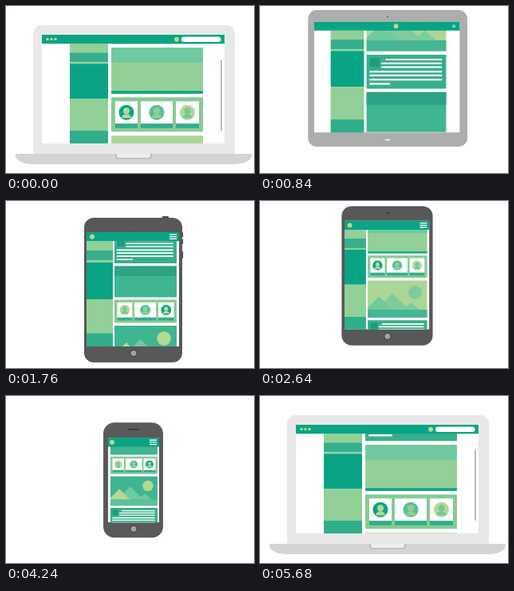
Recreate the animation shown at these times as an HTML page with a canvas. Size 311x209 px, loop 5.72 s.

```html
<!DOCTYPE html>
<html lang="en">
<head>
<meta charset="utf-8">
<title>Responsive layout</title>
<style>
html, body { margin: 0; width: 100%; height: 100%; overflow: hidden; background: #fff; }
canvas { display: block; width: 311px; height: 209px; }
</style>
</head>
<body>
<canvas id="stage" width="311" height="209"></canvas>
<script>
const ctx = document.getElementById('stage').getContext('2d');
const LOOP = 5720, PAGE = 241;
const DARK = '#0aa484', TEAL = '#3fb592', MID = '#70c99f', LIGHT = '#92d097', LIME = '#b4d993', WHITE = '#fff';

const KEYS = ['bx0', 'bx1', 'by0', 'by1', 'r', 'sx0', 'sx1', 'sy0', 'sy1',
  'side0', 'side1', 'main0', 'main1', 'avatar', 'grey', 'laptop', 'phone'];
const pose = (...values) => Object.fromEntries(KEYS.map((k, i) => [k, values[i]]));
const laptop = pose(34, 287, 24, 185, 10, 45, 274, 36, 172, 80, 128, 132, 247, 214, 232, 1, 0);
const tablet = pose(98, 221, 21, 202, 12, 101, 217, 39, 182, 101, 134, 136, 214, 108, 88, 0, 0);
const phone = pose(122, 197, 38, 182, 14, 128, 192, 57, 163, 128, 128, 131, 190, 133, 90, 0, 1);
// The sidebar leaves by shrinking but returns by sliding in from the left.
const phoneOut = { ...phone, side0: -156, side1: 0 };
const hops = [
  { at: 402, from: laptop, to: tablet },
  { at: 2289, from: tablet, to: phone },
  { at: 4175, from: phoneOut, to: laptop }
];

const clamp = v => Math.min(1, Math.max(0, v));
const mix = (a, b, p) => a + (b - a) * p;
const ramp = (t, a, b) => clamp((t - a) / (b - a));
const ease = (t, a, b) => (1 - Math.cos(Math.PI * ramp(t, a, b))) / 2;

function poseAt(t) {
  const hop = hops.filter(h => t >= h.at).pop() || { ...hops[2], at: hops[2].at - LOOP };
  const dt = t - hop.at, p = ease(dt, 200, 740), d = {};
  for (const k of KEYS) d[k] = mix(hop.from[k], hop.to[k], p);
  d.lift = -17.7 * ease(dt, 0, 190) + 21.7 * ease(dt, 740, 890) - 4 * ease(dt, 890, 1030);
  return d;
}

function scrollAt(t) {
  if (t < 700) t += LOOP;
  return 152 + 341.5 * ease(t, 1570, 2400) + 267 * ease(t, 3365, 4205) + 355.5 * ramp(t, 4840, 6420);
}

function box(x0, y0, x1, y1, fill, r = 0) {
  if (x1 <= x0 || y1 <= y0) return;
  ctx.fillStyle = fill;
  ctx.beginPath();
  ctx.roundRect(x0, y0, x1 - x0, y1 - y0, r);
  ctx.fill();
}

function oval(x, y, rx, fill, ry = rx, start = 0) {
  ctx.fillStyle = fill;
  ctx.beginPath();
  ctx.ellipse(x, y, rx, ry, 0, start, Math.PI * 2);
  ctx.fill();
}

function peak(x, y, half, fill) {
  ctx.fillStyle = fill;
  ctx.beginPath();
  ctx.moveTo(x - half, 57);
  ctx.lineTo(x, y);
  ctx.lineTo(x + half, 57);
  ctx.fill();
}

function hero(bright) {
  box(0, 0, 115, 57.5, bright ? LIGHT : TEAL);
  box(0, 0, 115, 18.5, bright ? MID : '#2da385');
  if (bright) box(0, 54, 115, 57.5, DARK);
}

function cards(bright) {
  box(0, 0, 115, 43, '#86cb95');
  const looks = [[DARK, LIME], ['#5abf98', LIGHT], [LIME, MID]];
  if (!bright) looks.reverse();
  [[5, 33], [37, 77], [81, 110]].forEach(([a, b], i) => {
    const x = (a + b) / 2, [back, person] = looks[i];
    box(a, 5, b, 33, WHITE);
    box(a, 33, b, 38.5, '#30ae8b');
    oval(x, 19, 9.5, back);
    oval(x, 17, 4, person);
    oval(x, 26, 6, person, 5, Math.PI);
  });
}

function mountains(bright) {
  box(0, 0, 115, 72, bright ? '#abd698' : TEAL);
  oval(91.5, 23.5, 13, bright ? '#7fcb9d' : LIME);
  ctx.save();
  ctx.beginPath();
  ctx.rect(0, 0, 115, 72);
  ctx.clip();
  peak(48, 25, 33, bright ? '#7fcb9d' : MID);
  peak(84, 42, 17, bright ? '#7fcb9d' : MID);
  peak(22, 31, 26, bright ? MID : LIME);
  ctx.restore();
  box(0, 56.5, 115, 72, bright ? '#45b693' : '#5dc09a');
}

function article() {
  box(0, 0, 115, 49, '#38af8c');
  box(5, 5, 19, 18, '#1f9c7f');
  [7, 12.5, 18, 24.5, 30, 36, 42].forEach((y, i) => {
    const x = i === 0 ? 27 : i < 3 ? 21 : 4;
    box(x, y - 1.25, i === 6 ? 34 : 109, y + 1.25, WHITE, 1.2);
  });
}

const blocks = [[0, hero], [62, cards], [110, mountains], [187, article]];

function drawPage(d, scroll) {
  const scale = (d.main1 - d.main0) / 115, view = (d.sy1 - d.sy0 - 11) / scale;
  ctx.save();
  ctx.translate(d.main0, d.sy0 + 11);
  ctx.scale(scale, scale);
  for (let k = Math.floor(scroll / PAGE); k * PAGE < scroll + view; k++) {
    for (const [top, draw] of blocks) {
      ctx.save();
      ctx.translate(0, k * PAGE + top - scroll);
      draw(k % 2 === 0);
      ctx.restore();
    }
  }
  ctx.restore();
}

function drawSidebar(d) {
  const rows = [0, 11, 23, 25, 69, 109, 126];
  const fills = [LIGHT, '#38af8c', LIGHT, DARK, LIGHT, '#30ae8b'];
  const top = d.sy0 + 11.3, scale = (d.sy1 - top) / 125;
  fills.forEach((fill, i) => box(d.side0, top + rows[i] * scale, d.side1, top + rows[i + 1] * scale, fill));
}

function drawNav(d, open) {
  const y = d.sy0 + 5.5, { laptop: l } = d;
  box(d.sx0, d.sy0, d.sx1, d.sy0 + 11.3, DARK);
  for (let i = 0; i < 3; i++) oval(d.sx0 + 7 + i * 5, y, 1.7 * open, LIME);
  oval(d.avatar, y + .3, 3, LIME);
  const right = d.sx1 - 4.5, reach = 49.5 * clamp((l - .7) * 4), half = mix(.5, 3.2, open);
  box(right - reach, y - half + .3, right, y + half + .3, WHITE, half);
  const k = 1 - l, x = d.sx1 - 7.5;
  if (k > .15) for (const row of [-2.5, .2, 2.9]) {
    box(x - 4.5 * k, y + (row - .65) * k, x + 4.5 * k, y + (row + .65) * k, WHITE);
  }
}

function drawButtons(t) {
  const fill = '#48494b';
  const a = 3 * (ease(t, 1290, 1390) - ease(t, 2200, 2289));
  if (a > 0) {
    box(196, 22 - a, 204, 24, fill, 1);
    for (const [y0, y1] of [[39, 45], [48, 54], [63, 72]]) box(216, y0, 220 + a * .7, y1, fill, 1);
  }
  const b = 2 * (ease(t, 3180, 3280) - ease(t, 4085, 4175));
  if (b > 0) {
    for (const y of [57, 69, 79]) box(122.5 - b, y, 126, y + 6, fill, 1);
    box(194, 69, 196.5 + b, 88, fill, 1);
  }
}

function drawBody(d, open) {
  const chin = clamp((d.laptop - .55) * 4), grey = v => `rgb(${v},${v},${v})`;
  const height = mix(11, 13, open) * chin, bottom = d.by1 + height;
  box(d.bx0, d.by0, d.bx1, mix(bottom, d.by1, open), grey(Math.round(d.grey)), [d.r, d.r, d.r * (1 - open), d.r * (1 - open)]);
  if (chin === 1) {
    const corner = { x: 9 + 13 * open, y: height * .8 };
    box(mix(d.bx0, 12, open), d.by1, mix(d.bx1, 308, open), bottom,
      grey(Math.round(mix(d.grey - 6, 212, open))), [0, 0, corner, corner]);
    const half = mix(13, 23, open);
    box(160 - half, d.by1, 160 + half, d.by1 + mix(4, 6.5, open), '#bdbdbd', [0, 0, 4, 4]);
    if (open > 0) box(162 - half, d.by1, 158 + half, d.by1 + 5 * open, '#eee', [0, 0, 3, 3]);
  }
  const ry = 4 * clamp(1 - d.laptop / .8), y = (bottom + d.sy1) / 2 - 1.5 + d.laptop * 3;
  if (ry > 0) {
    if (ry > 1.5) oval(160, y, 4.6, '#363636', ry + .6);
    oval(160, y, 3.6, ry > 1.5 ? '#a3a3a3' : '#eee', ry * .9);
    const w = .8 + 6.5 * d.phone;
    box(160 - w, d.by0 + 7.7, 160 + w, d.by0 + 9.3, '#363636', .8);
  }
}

function draw(t) {
  const d = poseAt(t), scroll = scrollAt(t);
  const open = t < 2800 ? 1 - ease(t, 380, 580) : ease(t, 4850, 5100);
  ctx.clearRect(0, 0, 311, 209);
  ctx.save();
  ctx.translate(0, d.lift);
  drawButtons(t);
  drawBody(d, open);
  ctx.beginPath();
  ctx.rect(d.sx0, d.sy0, d.sx1 - d.sx0, d.sy1 - d.sy0);
  ctx.clip();
  box(d.sx0, d.sy0, d.sx1, d.sy1, WHITE);
  drawPage(d, scroll);
  drawSidebar(d);
  if (open > 0) {
    const y = 68 + (scroll - 960) * .1;
    ctx.globalAlpha = open;
    box(269.2, y, 270.8, y + 89, '#a5aaa8', .8);
    ctx.globalAlpha = 1;
  }
  drawNav(d, open);
  ctx.restore();
}

function tick() {
  draw(performance.now() % LOOP);
  requestAnimationFrame(tick);
}
tick();
</script>
</body>
</html>
```
